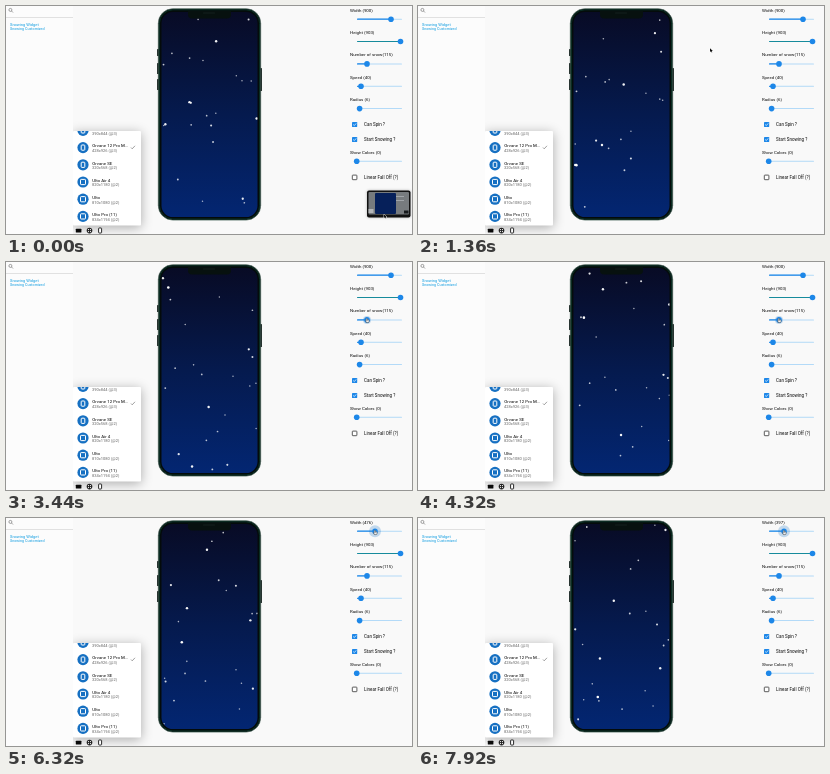
An HTML page with a canvas for the animation above (8000 ms loop, 406 by 228 pixels).

```html
<!DOCTYPE html>
<html>
<head>
<meta charset="utf-8">
<style>
html, body { margin: 0; width: 100%; height: 100%; overflow: hidden; background: #f9f9f9; }
canvas { display: block; width: 406px; height: 228px; }
</style>
</head>
<body>
<canvas id="stage"></canvas>
<script>
const W = 406, H = 228, LOOP = 8000, STEP = 80;
const BLUE = '#1d87e8', PALE = '#b3daf8', INK = '#080808';
const SCREEN = { x: 155.5, y: 6, w: 96, h: 205 };
const GRAB = 5200;
const canvas = document.getElementById('stage');
const ctx = canvas.getContext('2d');
const dpr = window.devicePixelRatio || 1;
canvas.width = W * dpr;
canvas.height = H * dpr;
ctx.scale(dpr, dpr);

function seeded(seed) {
  return () => {
    seed = (seed * 1664525 + 1013904223) % 4294967296;
    return seed / 4294967296;
  };
}

// Near flakes are larger, brighter and faster.
const random = seeded(12);
const flakes = Array.from({ length: 24 }, () => {
  const near = random() ** 2;
  return {
    x: random() * SCREEN.w,
    y: random() * SCREEN.h,
    fall: 13 + 22 * near,
    drift: (random() - 0.5) * 8,
    sway: random() * Math.PI * 2,
    r: 0.75 + 0.55 * near,
    alpha: 0.65 + 0.35 * near
  };
});

// Pointer stops: time, x, y.
const stops = [
  [0, 379, 210], [500, 379, 210], [1360, 293, 44], [2560, 370, 42], [3400, 361, 58],
  [4400, 361, 58], [GRAB, 385, 13], [6320, 369, 14], [7000, 366, 14]
];

const wrap = (v, size) => ((v % size) + size) % size;
const clamp = v => Math.min(1, Math.max(0, v));

function pointerAt(t) {
  const i = stops.findIndex(s => s[0] > t);
  if (i < 0) return stops[stops.length - 1].slice(1);
  const [t0, x0, y0] = stops[i - 1], [t1, x1, y1] = stops[i];
  const p = (t - t0) / (t1 - t0);
  return [x0 + (x1 - x0) * p, y0 + (y1 - y0) * p];
}

function rect(x, y, w, h, r, fill, stroke, line = 1) {
  ctx.beginPath();
  ctx.roundRect(x, y, w, h, r);
  if (fill) { ctx.fillStyle = fill; ctx.fill(); }
  if (stroke) { ctx.strokeStyle = stroke; ctx.lineWidth = line; ctx.stroke(); }
}

function dot(x, y, r, fill) {
  ctx.beginPath();
  ctx.arc(x, y, r, 0, Math.PI * 2);
  ctx.fillStyle = fill;
  ctx.fill();
}

function poly(points, stroke, line) {
  ctx.beginPath();
  points.forEach(([x, y]) => ctx.lineTo(x, y));
  ctx.strokeStyle = stroke;
  ctx.lineWidth = line;
  ctx.stroke();
}

function text(s, x, y, size = 4.4, fill = INK) {
  ctx.font = `${size}px Roboto, sans-serif`;
  ctx.textBaseline = 'middle';
  ctx.fillStyle = fill;
  ctx.fillText(s, x, y);
}

function drawSidebar() {
  rect(0, 0, 67, H, 0, '#fcfcfc');
  ctx.beginPath();
  ctx.arc(4.4, 3.9, 1.5, 0, Math.PI * 2);
  ctx.strokeStyle = '#666';
  ctx.lineWidth = 0.6;
  ctx.stroke();
  poly([[5.5, 5], [7, 6.5]], '#666', 0.6);
  rect(0, 11, 67, 0.7, 0, '#d8d8d8');
  text('Snowing Widget', 4, 18.6, 4, '#0c9be0');
  text('Snowing Customized', 4, 22.9, 3.7, '#0c9be0');
}

function drawMenu() {
  ctx.save();
  ctx.shadowColor = 'rgba(0,0,0,.32)';
  ctx.shadowBlur = 12 * dpr;
  ctx.shadowOffsetY = 2 * dpr;
  rect(67, 125, 68, 94.5, 1, '#fff');
  ctx.restore();

  ctx.save();
  ctx.beginPath();
  ctx.rect(67, 125, 68, 94.5);
  ctx.clip();
  const items = [
    ['Orvane 12', '390x844 (@3)'], ['Orvane 12 Pro M...', '428x926 (@3)'],
    ['Orvane SE', '320x568 (@2)'], ['Ulto Air 4', '820x1180 (@2)'],
    ['Ulto', '810x1080 (@2)'], ['Ulto Pro (11)', '834x1194 (@2)']
  ];
  items.forEach(([name, size], i) => {
    const y = 124.4 + i * 17.2;
    const wide = i > 2 ? 5 : 3.6;
    dot(77, y, 5.6, '#1670c2');
    rect(77 - wide / 2, y - 2.6, wide, 5.2, 0.7, null, '#fff', 1);
    text(name, 86.3, y - 1.4);
    text(size, 86, y + 3.2, 4, '#666');
  });
  poly([[125, 141.5], [126.2, 142.8], [129, 139.8]], '#777', 0.7);
  ctx.restore();

  rect(69.8, 222.7, 5.6, 3.8, 0.5, '#0a0a0a');
  dot(83.5, 224.6, 2.8, '#222');
  for (const x of [-1, 1]) for (const y of [-1, 1]) dot(83.5 + x, 224.6 + y, 0.6, '#fff');
  rect(92.6, 222, 3, 5, 0.6, '#fff', '#111', 0.9);
}

function drawSnow(t) {
  const s = t / 1000;
  for (const f of flakes) {
    const x = f.x + f.drift * s + 2 * Math.sin(s + f.sway);
    dot(SCREEN.x + wrap(x, SCREEN.w), SCREEN.y + wrap(f.y + f.fall * s, SCREEN.h),
      f.r, `rgba(255,255,255,${f.alpha})`);
  }
}

function drawPhone(t) {
  for (const [y, h] of [[43, 7], [57, 11], [73, 11]]) rect(151, y, 2, h, 0.6, '#222c2a');
  rect(254, 62, 2, 23, 0.6, '#222c2a');
  rect(152.3, 2.7, 102.4, 211.4, 14.5, '#040b0b', '#4f6b61', 0.7);
  rect(153.4, 3.8, 100.2, 209.2, 13.5, null, '#0c3a2b', 0.8);
  const { x, y, w, h } = SCREEN;
  ctx.save();
  const sky = ctx.createLinearGradient(0, y, 0, y + h);
  sky.addColorStop(0, '#080b25');
  sky.addColorStop(0.5, '#051a4e');
  sky.addColorStop(1, '#032672');
  rect(x, y, w, h, 11.5, sky);
  ctx.clip();
  drawSnow(t);
  ctx.restore();
  rect(182, 5, 43, 7.4, [0, 0, 4, 4], '#07110f');
  rect(197, 6.6, 12, 1, 0.5, '#15201e');
}

function slider(label, y, x, halo = 0, active = BLUE) {
  text(label, 344, y - 8.9);
  rect(351, y - 0.5, 45, 1, 0.5, PALE);
  rect(351, y - 0.6, x - 351, 1.2, 0.6, active);
  if (halo) dot(x, y, halo, 'rgba(32,120,200,.25)');
  dot(x, y, 2.8, BLUE);
}

function checkbox(label, y, on) {
  if (on) {
    rect(346, y - 2.6, 5.2, 5.2, 0.7, BLUE);
    poly([[347.2, y], [348.3, y + 1.1], [350.2, y - 1.1]], '#fff', 0.7);
  } else {
    rect(346.3, y - 2.3, 4.6, 4.6, 0.6, '#fff', '#333', 0.8);
  }
  text(label, 358, y + 0.2, 4.5);
}

function drawControls(t) {
  const held = t >= GRAB;
  const x = held ? pointerAt(t)[0] : 385;
  const width = Math.round((x - 351) * 26.47);
  slider(`Width (${width})`, 13.2, x, held ? 6 : 0);
  slider('Height (903)', 35.5, 394.5, 0, '#168b9c');
  slider('Number of snow(115)', 57.9, 361, t > 3300 && t < 4500 ? 4 : 0);
  slider('Speed (40)', 80.3, 355);
  slider('Radius (6)', 102.6, 353.6);
  checkbox('Can Spin ?', 118.5, true);
  checkbox('Start Snowing ?', 133.5, true);
  slider('Show Colors (0)', 155.2, 350.7);
  checkbox('Linear Fall Off (?)', 171.4, false);
}

function drawThumbnail(t) {
  const p = clamp((t - 320) / 560);
  if (p === 1) return;
  ctx.save();
  ctx.translate(48 * p * p, 0);
  ctx.shadowColor = 'rgba(0,0,0,.3)';
  ctx.shadowBlur = 3 * dpr;
  rect(361, 184.5, 43.5, 27, 2, '#111');
  ctx.shadowBlur = 0;
  rect(362.5, 186, 40.5, 22.5, 1, '#777b7e');
  rect(369, 187, 21, 21, 1, '#06205a');
  rect(390, 190, 8, 1, 0, '#a0a4a8');
  rect(390, 194, 8, 1, 0, '#a0a4a8');
  rect(398, 204.5, 4.5, 3, 0, '#16191c');
  rect(362.5, 203, 5, 4, 0, '#b4b6b8');
  ctx.restore();
}

function drawPointer(t) {
  const [x, y] = pointerAt(t);
  ctx.save();
  ctx.translate(x, y);
  if (t > 2300) {
    rect(-1.2, -0.4, 3.2, 3, 1, '#fff', '#333', 0.5);
    rect(-0.7, -1.8, 1.1, 3, 0.5, '#fff', '#333', 0.4);
  } else {
    ctx.beginPath();
    [[-1, -1.8], [-1, 2], [0, 1.2], [0.7, 2.5], [1.3, 2.2], [0.7, 0.9], [1.9, 0.9]]
      .forEach(p => ctx.lineTo(...p));
    ctx.closePath();
    ctx.strokeStyle = '#fff';
    ctx.lineWidth = 0.7;
    ctx.stroke();
    ctx.fillStyle = '#111';
    ctx.fill();
  }
  ctx.restore();
}

function draw(t) {
  rect(0, 0, W, H, 0, '#f9f9f9');
  drawMenu();
  drawSidebar();
  drawPhone(t);
  drawControls(t);
  drawThumbnail(t);
  drawPointer(t);
}

const start = performance.now();
function tick() {
  const t = (performance.now() - start) % LOOP;
  draw(Math.floor(t / STEP) * STEP);
  requestAnimationFrame(tick);
}
tick();
</script>
</body>
</html>
```
